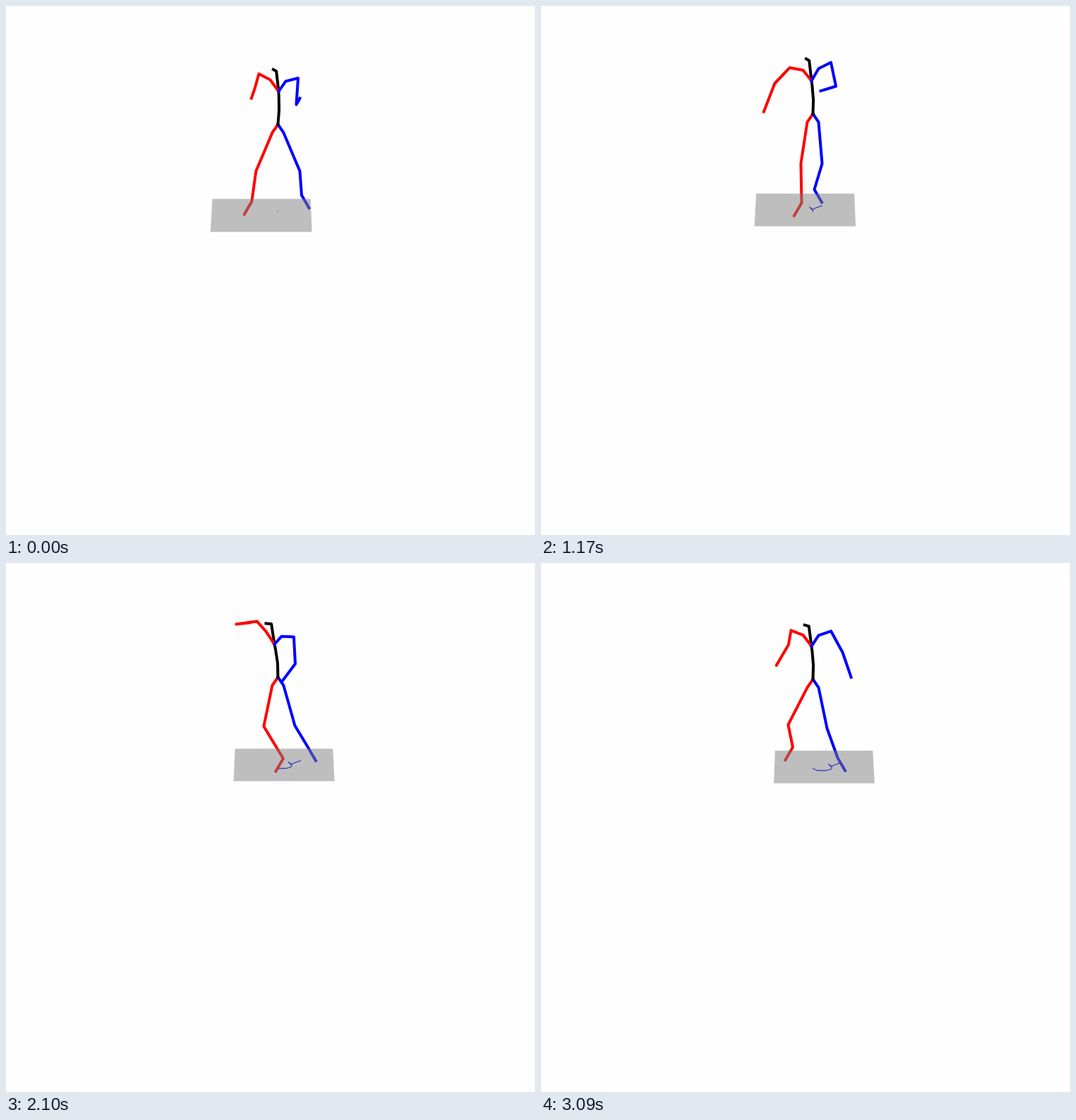
Animation, 748 px wide and 748 px high, one loop 3.12 s. Source, as an HTML page with a canvas:

```html
<!DOCTYPE html>
<html lang="en">
<head>
<meta charset="utf-8">
<title>Stick figure motion</title>
<style>
html, body { margin: 0; width: 100%; height: 100%; overflow: hidden; background: #fefefe; }
canvas { display: block; }
</style>
</head>
<body>
<canvas id="stage" width="748" height="748"></canvas>
<script>
const ctx = document.getElementById('stage').getContext('2d');
const LOOP = 3120, STEP = 30, CENTER = 384, THIGH = 59;
const RED = '#f00', BLUE = '#00f';

// ground: plane shift; body: pelvis height, lean, head turn, shoulder tilt
// legs: knee x, ankle x, ankle y; arms: elbow, wrist
const poses = [
  { t: 0, ground: [0, 0], body: [167, 1, -5, 1.8],
    redLeg: [353, 347, 276], blueLeg: [415, 417.5, 267],
    redArm: [351, 117, 346.5, 130], blueArm: [410, 139, 415, 130] },
  { t: 660, ground: [12, -5], body: [160, 0, 0, -1.5],
    redLeg: [374, 394, 269], blueLeg: [405.5, 403.5, 254],
    redArm: [339, 118, 348, 135], blueArm: [414.5, 116, 405, 127.5] },
  { t: 1170, ground: [12.5, -8], body: [152, -2, -5, -3],
    redLeg: [367, 368, 278], blueLeg: [397, 386, 259],
    redArm: [330, 109, 314.5, 149], blueArm: [416.5, 113, 395, 119.5] },
  { t: 1560, ground: [22, -11], body: [159, 2, -2, 0],
    redLeg: [366, 389, 277], blueLeg: [405, 414, 257],
    redArm: [346, 115, 346.5, 135], blueArm: [416, 121, 404, 127.5] },
  { t: 2100, ground: [32, -11], body: [161, -5, -9, 7.5],
    redLeg: [364, 391.5, 276], blueLeg: [408, 427, 261],
    redArm: [325, 86, 344, 84], blueArm: [408.5, 142, 390.5, 166] },
  { t: 2550, ground: [35, -10], body: [156, 0, -7, 2],
    redLeg: [360, 370, 263], blueLeg: [403.5, 405, 273],
    redArm: [327, 87, 330.5, 105], blueArm: [425, 117.5, 391.5, 126] },
  { t: 3090, ground: [39.2, -8], body: [164, -2, -7, 0],
    redLeg: [349, 355.5, 260], blueLeg: [404, 419, 275],
    redArm: [349.5, 115, 332.5, 144], blueArm: [426, 126, 438, 161] }
];

function segment(t) {
  const next = poses.findIndex(p => p.t >= t && p.t > 0);
  const i = next - 1;
  return [i, (t - poses[i].t) / (poses[next].t - poses[i].t)];
}

// Monotone cubic interpolation of one part of the pose.
function sample(part, t) {
  const [i, u] = segment(t), last = poses.length - 1;
  const value = (j, k) => poses[j][part][k];
  const rate = (j, k) => (value(j + 1, k) - value(j, k)) / (poses[j + 1].t - poses[j].t);
  const slope = (j, k) => {
    if (j === 0) return rate(0, k);
    if (j === last) return rate(last - 1, k);
    const a = rate(j - 1, k), b = rate(j, k);
    return a * b > 0 ? 2 * a * b / (a + b) : 0;
  };
  const h = poses[i + 1].t - poses[i].t;
  return poses[i][part].map((a, k) =>
    a + (value(i + 1, k) - a) * u * u * (3 - 2 * u)
      + h * u * (1 - u) * ((1 - u) * slope(i, k) - u * slope(i + 1, k)));
}

// The ground drifts, with one swing out and back.
function groundAt(t) {
  const [x, y] = sample('ground', t);
  const swing = 5 * Math.exp(-(((t - 880) / 100) ** 2));
  return [x + swing, y + swing * 0.9];
}

// The body rises a little between two poses.
const riseAt = t => 5 * Math.sin(Math.PI * segment(t)[1]) ** 2;

const add = ([x, y], dx, dy) => [x + dx, y + dy];

function line(pts, color, width = 4) {
  ctx.beginPath();
  pts.forEach(p => ctx.lineTo(...p));
  ctx.strokeStyle = color;
  ctx.lineWidth = width;
  ctx.stroke();
}

function drawLeg(part, t, pelvis, side, color) {
  const [kneeX, ankleX, ankleY] = sample(part, t);
  const hip = add(pelvis, side * 8, 11.7);
  const knee = [kneeX, hip[1] + Math.sqrt(THIGH ** 2 - (kneeX - hip[0]) ** 2)];
  const ankle = [ankleX, ankleY];
  line([pelvis, hip, knee, ankle, add(ankle, side * 10.5, 18)], color);
}

function drawArm(part, t, chest, collar, shoulder, color) {
  const [ex, ey, wx, wy] = sample(part, t), rise = riseAt(t);
  line([chest, collar, shoulder, [ex, ey - rise], [wx, wy - rise]], color);
}

function drawFigure(t) {
  const [height, lean, turn, tilt] = sample('body', t);
  const pelvis = [CENTER, height - riseAt(t)];
  const chest = add(pelvis, lean, -46.7);
  const neck = add(chest, turn / 4 - 2, -28.5);
  const head = add(neck, turn * 0.85, -4.5 - turn * 0.4);

  drawLeg('redLeg', t, pelvis, -1, RED);
  drawLeg('blueLeg', t, pelvis, 1, BLUE);
  line([pelvis, add(pelvis, 1.3 + lean * 0.35, -20),
    add(pelvis, 0.5 + lean * 0.8, -40), chest, neck, head], '#000');

  const redCollar = add(chest, -12, -16 - tilt * 0.3);
  const blueCollar = add(chest, 10, -15.5 + tilt * 0.6);
  drawArm('redArm', t, chest, redCollar,
    add(redCollar, -17 + tilt * 0.6, -6.5 - tilt), RED);
  drawArm('blueArm', t, chest, blueCollar,
    add(blueCollar, 17.5, -6 + tilt * 0.9), BLUE);
}

function drawTrail(t) {
  const [gx, gy] = groundAt(t), pts = [];
  for (let s = 0; s <= t; s += STEP) {
    const [x, y] = groundAt(s);
    pts.push([CENTER + gx - x, 290 + gy - y]);
  }
  line(pts, BLUE, 1.3);
}

function drawPlane(t) {
  const [x, y] = groundAt(t);
  const top = 272.3 + y * 0.93, bottom = 319 + y;
  ctx.beginPath();
  ctx.moveTo(291.3 + x, top);
  ctx.lineTo(430.3 + x * 0.98, top);
  ctx.lineTo(432 + x, bottom);
  ctx.lineTo(288.5 + x * 1.025, bottom);
  ctx.fillStyle = 'rgba(128,128,128,.5)';
  ctx.fill();
}

function draw(t) {
  ctx.setTransform(1, 0, 0, 1, 0, 0);
  ctx.fillStyle = '#fefefe';
  ctx.fillRect(0, 0, 748, 748);
  ctx.lineJoin = 'round';
  ctx.lineCap = 'square';
  ctx.translate(0.5, 0.5);
  drawTrail(t);
  drawFigure(t);
  drawPlane(t);
}

const start = performance.now();
function tick() {
  const t = (performance.now() - start) % LOOP;
  draw(Math.floor(t / STEP) * STEP);
  requestAnimationFrame(tick);
}
tick();
</script>
</body>
</html>
```
